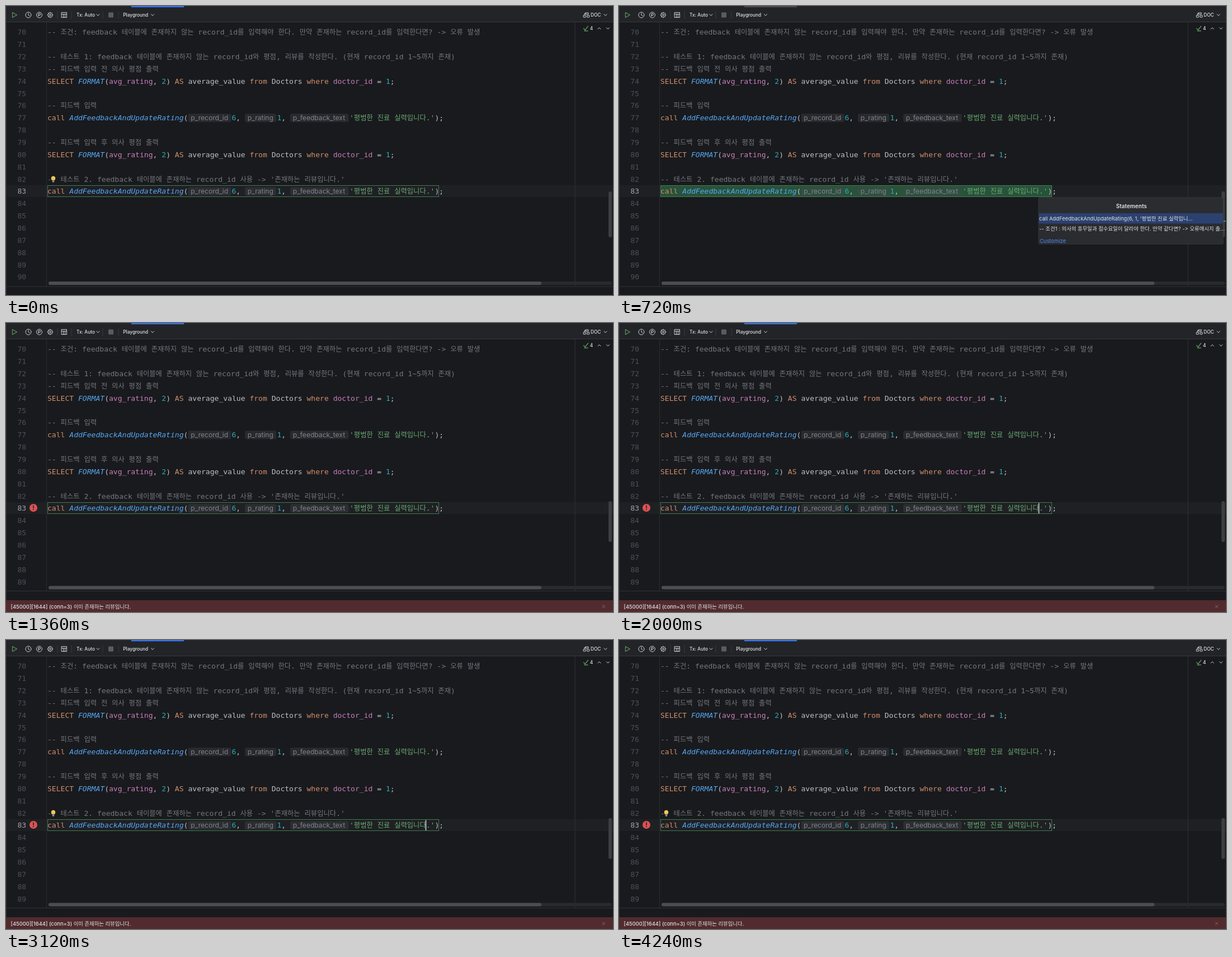
An HTML page that plays this animation: 1085x516 px, repeating every 4.32 s.

```html
<!DOCTYPE html>
<html lang="ko">
<head>
<meta charset="utf-8">
<title>SQL editor</title>
<style>
html, body { margin: 0; width: 100%; height: 100%; overflow: hidden; background: #191a1d; }
svg { display: block; width: 1085px; height: 516px; }
text { white-space: pre; }
.code { font: 13.06px "DejaVu Sans Mono", monospace; fill: #bcbec4; }
.ko { font: 12.3px "Noto Sans CJK KR", "Noto Sans CJK", sans-serif; }
.ui { font: 9.4px Inter, "Noto Sans CJK KR", "Noto Sans CJK", sans-serif; fill: #dfe1e5; }
.bar { font-size: 8.3px; font-weight: 500; }
.hint { font: 12.1px Inter, sans-serif; fill: #7f838a; }
.comment { fill: #73777e; }
.key { fill: #cf8e6d; }
.fn { fill: #56a8f5; font-style: italic; }
.col { fill: #c77dbb; }
.num { fill: #2aacb8; }
.str { fill: #6aab73; }
.icon { fill: none; stroke: #ced0d6; stroke-width: 1; stroke-linecap: round; stroke-linejoin: round; }
</style>
</head>
<body>
<svg id="stage" viewBox="0 0 1085 516"></svg>
<script>
const LOOP = 4320, PITCH = 21.86, LEFT = 74;
const baseline = n => 51.2 + (n - 70) * PITCH;

const rect = (x, y, w, h, fill, extra = '') =>
  `<rect x="${x}" y="${y}" width="${w}" height="${h}" fill="${fill}" ${extra}/>`;
const path = (d, extra = '') => `<path class="icon" d="${d}" ${extra}/>`;
const group = (id, body) => `<g id="${id}">${body}</g>`;
const escape = s => s.replace(/&/g, '&amp;').replace(/</g, '&lt;').replace(/>/g, '&gt;');
const hangul = s => escape(s).replace(/[가-힣]+/g, '<tspan class="ko">$&</tspan>');
const span = (cls, s) => `<tspan class="${cls}">${hangul(s)}</tspan>`;
const code = (x, n, body) => `<text class="code" x="${x}" y="${baseline(n)}">${body}</text>`;
const ui = (x, y, s, cls = '', extra = '') =>
  `<text class="ui ${cls}" x="${x}" y="${y}" ${extra}>${escape(s)}</text>`;
const chevron = (x, y, dir = 1) =>
  path(`M${x - 2.5} ${y - 1.3 * dir}L${x} ${y + 1.3 * dir}L${x + 2.5} ${y - 1.3 * dir}`);

const comment = (n, s) => code(LEFT, n, span('comment', s));

const select = n => code(LEFT, n,
  span('key', 'SELECT ') + span('fn', 'FORMAT') + '(' + span('col', 'avg_rating') + ', ' +
  span('num', '2') + ') ' + span('key', 'AS') + ' average_value ' + span('key', 'from') +
  ' Doctors ' + span('key', 'where ') + span('col', 'doctor_id') + ' = ' + span('num', '1') + ';');

function hint(x, width, n, s) {
  const y = baseline(n);
  return rect(x, y - 12, width, 15, '#484b51', 'rx="3" fill-opacity=".34"') +
    `<text class="hint" x="${x + 4.8}" y="${y}">${s}</text>`;
}

const call = n =>
  code(LEFT, n, span('key', 'call ') + span('fn', 'AddFeedbackAndUpdateRating') + '(') +
  hint(325.5, 77, n, 'p_record_id') + code(403.5, n, span('num', '6') + ',') +
  hint(427, 56, n, 'p_rating') + code(484.5, n, span('num', '1') + ',') +
  hint(508, 104.5, n, 'p_feedback_text') +
  code(614, n, span('str', "'평범한 진료 실력입니다.'") + ');');

function toolbar() {
  const gear = Array.from({ length: 8 }, (_, i) => {
    const a = i * Math.PI / 4, c = Math.cos(a), s = Math.sin(a);
    return `M${79 + 3.9 * c} ${16 + 3.9 * s}L${79 + 5 * c} ${16 + 5 * s}`;
  }).join('');
  return rect(0, 0, 1085, 28, '#232427') + rect(0, 28, 1085, 1, '#36383c') +
    path('M11.5 11.5L19.5 16L11.5 20.5Z', 'style="stroke:#57965c;stroke-width:1.2"') +
    path('M45 16a5 5 0 1 1-10 0a5 5 0 1 1 10 0M40 13V16.3L42.3 17.5') +
    path('M64.5 16a5 5 0 1 1-10 0a5 5 0 1 1 10 0M58 18.7V13.3H60a1.6 1.6 0 0 1 0 3.2H58') +
    path(gear + 'M83 16a4 4 0 1 1-8 0a4 4 0 1 1 8 0M80.5 16a1.5 1.5 0 1 1-3 0a1.5 1.5 0 1 1 3 0') +
    path('M99.5 11.5H108.5V20.5H99.5ZM99.5 14.5H108.5M102.5 14.5V20.5M105.5 14.5V20.5') +
    [91.5, 116.5, 172.5, 200.5].map(x => rect(x, 9, 1, 14, '#36383c')).join('') +
    ui(126, 19, 'Tx: Auto', 'bar') + chevron(164.5, 16) +
    rect(183, 11.5, 9, 9, '#5a5c60', 'rx="1"') +
    ui(209.3, 19, 'Playground', 'bar') + chevron(262, 16) +
    path('M1032.5 16.5H1036V20H1032.5ZM1039 16.5H1042.5V20H1039ZM1036 12H1041V14.5H1036ZM1034 16V13.5H1036') +
    ui(1045, 19, 'DOC', 'bar') + chevron(1071.5, 16);
}

const inspections = () =>
  path('M1032.5 40L1035 43L1040.5 36M1034 44.5H1040', 'style="stroke:#57965c;stroke-width:1.3"') +
  ui(1043.8, 43, '4', 'bar') + chevron(1060.5, 40, -1) + chevron(1076, 40);

// Horizontal scrollbar and lower edge of the editor pane
const paneEnd = y =>
  rect(76, y - 8.5, 1007, 6, '#292a2d', 'rx="3"') + rect(76, y - 8.5, 881, 6, '#4c4d50', 'rx="3"') +
  rect(0, y, 1085, 1, '#303236');
const thumb = (y, h) => rect(1077, y, 6, h, '#3d3e42', 'rx="3"');

const popup = () =>
  rect(750, 342, 330, 83, '#2a2c2f', 'rx="2" stroke="#3b3d42" stroke-width=".8"') +
  ui(916, 360.5, 'Statements', '', 'text-anchor="middle" style="font-size:10px;font-weight:600"') +
  rect(750.5, 370, 329, 18.5, '#2b4170') +
  ui(751, 382.5, "call AddFeedbackAndUpdateRating(6, 1, '평범한 진료 실력입니...") +
  ui(751, 400.8, '-- 조건1 : 의사의 휴무일과 접수요일이 달라야 한다. 만약 같다면? -> 오류메시지 출...') +
  ui(752, 422.5, 'Customize', '', 'style="fill:#548af7"');

const bulb = () =>
  rect(79.5, 303, 11, 13, '#191a1d') +
  '<path d="M82.4 311.3C80 309.5 79.8 303.8 84.5 303.8S89 309.5 86.6 311.3Z" fill="#f2c55c"/>' +
  rect(82.5, 312, 4, 1, '#ced0d6') + rect(83, 313.7, 3, 1, '#ced0d6');

const errorBar = () =>
  rect(0, 495, 1085, 21, '#512b2e') +
  ui(8.5, 510, '[45000][1644] (conn=3) 이미 존재하는 리뷰입니다.', '', 'style="font-weight:500"') +
  path('M1066 504L1070.5 508.5M1070.5 504L1066 508.5', 'style="stroke:#85696c"') +
  '<circle cx="49" cy="330" r="7" fill="#db5252"/>' +
  rect(48.2, 325.8, 1.6, 5, '#1e1f22') + rect(48.2, 332.2, 1.6, 1.7, '#1e1f22');

const numbers = Array.from({ length: 21 }, (_, i) => 70 + i).map(n =>
  group('line' + n, code(20.5, n, `<tspan fill="${n === 83 ? '#a1a3ab' : '#4b5059'}">${n}</tspan>`)));

document.getElementById('stage').innerHTML =
  rect(0, 0, 1085, 516, '#191a1d') +
  rect(0, 320, 1085, 21, '#1f2024') +
  group('tall', rect(72, 29, 1, 471, '#2a2c2f') + rect(1016.5, 29, 1, 471, '#303236') + paneEnd(500.5) + thumb(331, 82)) +
  group('short', rect(72, 29, 1, 449, '#2a2c2f') + rect(1016.5, 29, 1, 449, '#303236') + paneEnd(478) + thumb(318, 73)) +
  toolbar() + rect(0, 0, 1, 516, '#2b2d30') +
  group('focused', rect(224, 0, 94, 2.3, '#3574f0')) +
  group('unfocused', rect(224, 0, 94, 2.3, '#4b4d52')) +
  inspections() + numbers.join('') +
  group('preview', rect(74, 320.5, 700, 20, '#285239') + rect(1074, 383.5, 11, 1.5, '#5a9b6a')) +
  rect(74.5, 320.5, 699, 20, 'none', 'stroke="#417a50"') +
  comment(70, '-- 조건: feedback 테이블에 존재하지 않는 record_id를 입력해야 한다. 만약 존재하는 record_id를 입력한다면? -> 오류 발생') +
  comment(72, '-- 테스트 1: feedback 테이블에 존재하지 않는 record_id와 평점, 리뷰를 작성한다. (현재 record_id 1~5까지 존재)') +
  comment(73, '-- 피드백 입력 전 의사 평점 출력') + select(74) +
  comment(76, '-- 피드백 입력') + call(77) +
  comment(79, '-- 피드백 입력 후 의사 평점 출력') + select(80) +
  comment(82, "-- 테스트 2. feedback 테이블에 존재하는 record_id 사용 -> '존재하는 리뷰입니다.'") + call(83) +
  group('bulb', bulb()) +
  group('caret', rect(749.7, 321.5, 1.6, 18.5, '#ced0d6')) +
  group('error', errorBar()) +
  group('popup', popup()) +
  group('pointer', '<path d="M1078.5 231L1082.5 227V229.5H1086V232.5H1082.5V235Z" fill="#111" stroke="#fff"/>');

// Visible spans of each part, in ms
const ERROR_AT = 1360;
const spans = {
  focused: [[0, 640], [1280, LOOP]],
  unfocused: [[640, 1280]],
  preview: [[640, 1280]],
  popup: [[640, 1200]],
  bulb: [[0, 640], [2320, LOOP]],
  caret: [[240, 640], [1700, 2200], [2700, 3200], [3700, 4200]],
  tall: [[0, ERROR_AT]],
  line90: [[0, ERROR_AT]],
  short: [[ERROR_AT, LOOP]],
  error: [[ERROR_AT, LOOP]],
  pointer: [[3520, 3760]]
};
const parts = Object.entries(spans).map(([id, list]) => [document.getElementById(id), list]);
const start = performance.now();

function draw() {
  const t = (performance.now() - start) % LOOP;
  for (const [el, list] of parts)
    el.style.display = list.some(([from, to]) => t >= from && t < to) ? '' : 'none';
  requestAnimationFrame(draw);
}
draw();
</script>
</body>
</html>
```
